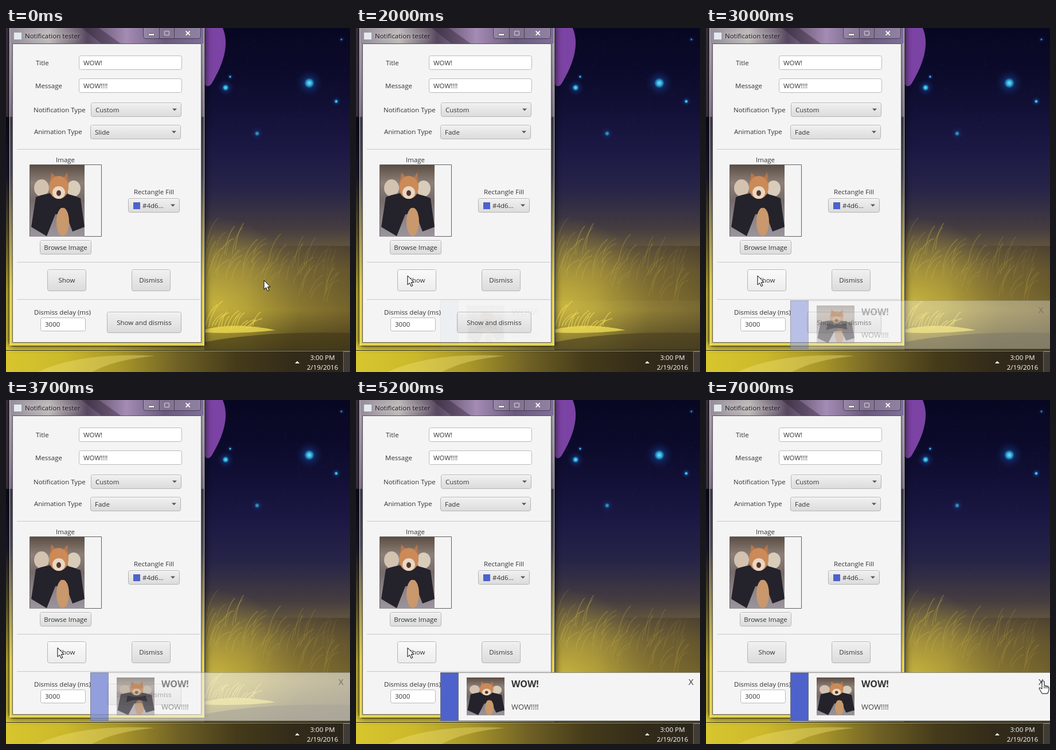
These frames come from a looping animation (600 px wide and 600 px high, 7100 ms). An HTML page with a canvas:

```html
<!DOCTYPE html>
<html lang="en">
<head>
<meta charset="utf-8">
<title>Notification tester</title>
<style>
html, body { margin: 0; width: 100%; height: 100%; overflow: hidden; background: #0b0a20; }
canvas { display: block; width: 600px; height: 600px; }
</style>
</head>
<body>
<canvas id="stage" width="600" height="600"></canvas>
<script>
const LOOP = 7100, STEP = 100;
const FONT = '"Open Sans", "Noto Sans", sans-serif';
const BLUE = '#4d62cb', INK = '#333';
const screen = document.getElementById('stage').getContext('2d');
let c = screen;

// Colours are spaced evenly along the line.
function blend(g, colors) {
  colors.forEach((color, i) => g.addColorStop(i / (colors.length - 1), color));
  return g;
}
const down = (y, h, ...colors) => blend(c.createLinearGradient(0, y, 0, y + h), colors);
const across = (x, w, ...colors) => blend(c.createLinearGradient(x, 0, x + w, 0), colors);

function rect(x, y, w, h, fill) {
  c.fillStyle = fill;
  c.fillRect(x, y, w, h);
}

function box(x, y, w, h, r, fill, line, width = 1) {
  c.beginPath();
  c.roundRect(x + 0.5, y + 0.5, w - 1, h - 1, r);
  if (fill) { c.fillStyle = fill; c.fill(); }
  if (line) { c.strokeStyle = line; c.lineWidth = width; c.stroke(); }
}

function text(s, x, y, color = INK, size = 11.5, weight = 400, align = 'left') {
  c.font = `${weight} ${size}px ${FONT}`;
  c.textAlign = align;
  c.fillStyle = color;
  c.fillText(s, x, y);
}

function shape(path, fill, line) {
  const p = new Path2D(path);
  c.fillStyle = fill;
  c.fill(p);
  if (line) { c.strokeStyle = line; c.lineWidth = 1; c.stroke(p); }
}

function oval(x, y, rx, ry, fill) {
  c.beginPath();
  c.ellipse(x, y, rx, ry, 0, 0, Math.PI * 2);
  c.fillStyle = fill;
  c.fill();
}

function glow(x, y, r, ...colors) {
  oval(x, y, r, r, blend(c.createRadialGradient(x, y, 0, x, y, r), colors));
}

function withShadow(blur, color, paint) {
  c.save();
  c.shadowBlur = blur;
  c.shadowColor = color;
  paint();
  c.restore();
}

function seeded(seed) {
  return () => (seed = (seed * 16807) % 2147483647) / 2147483647;
}

function star(x, y, r) {
  glow(x, y, r * 3, 'rgba(30,125,205,0.8)', 'rgba(20,70,150,0.3)', 'rgba(15,40,110,0)');
  glow(x, y, r, '#7de2f5', '#35b5dc', 'rgba(35,150,210,0.3)');
}

function drawSky() {
  rect(0, 0, 600, 600, down(0, 562, '#080722', '#0b0a2a', '#121036', '#1b1944',
    '#272448', '#463d40', '#85743a', '#a18e34', '#53481c'));
  glow(365, 480, 150, 'rgba(222,202,66,0.6)', 'rgba(215,195,62,0.3)', 'rgba(215,195,62,0)');
  rect(420, 380, 180, 182, across(420, 180, 'rgba(50,38,28,0)', 'rgba(50,38,28,0.4)'));

  const rnd = seeded(71);
  for (let i = 0; i < 60; i++) {
    rect(348 + rnd() * 250, rnd() * 210, 1, 1, 'rgba(80,120,205,0.3)');
  }
  star(529, 96, 8);
  star(383, 104, 5);
  star(391, 85, 2);
  star(576, 128, 3);
  c.globalAlpha = 0.6;
  star(438, 184, 4);
  star(585, 20, 2);
  c.globalAlpha = 1;
  shape('M346 0H378C390 28 380 62 358 98Q350 106 346 96Z', '#7b43a3');
}

function blade(x, y, dx, dy, color, width) {
  c.beginPath();
  c.moveTo(x, y);
  c.quadraticCurveTo(x + dx * 0.25, y + dy * 0.7, x + dx, y + dy);
  c.strokeStyle = color;
  c.lineWidth = width;
  c.stroke();
}

function drawGrass() {
  const rnd = seeded(19);
  for (let i = 0; i < 70; i++) {
    const far = rnd();
    blade(348 + far * 220, 375 + far * 45 + rnd() * 60, 8 + rnd() * 18, -20 - rnd() * 32,
      `rgba(205,182,72,${0.4 - far * 0.25})`, 0.7 + rnd());
  }
  for (let i = 0; i < 16; i++) {
    blade(348 + i * 5.5, 526 - rnd() * 8, 8 + rnd() * 22, -10 - rnd() * 42,
      'rgba(240,220,82,0.6)', 1.6);
  }
  shape('M346 526Q400 512 470 527Q410 534 346 531Z', 'rgba(243,224,82,0.75)');
  shape('M346 548Q450 528 600 532V562H346Z', 'rgba(65,56,24,0.6)');
  rect(0, 0, 6, 155, '#443b49');
  rect(0, 155, 6, 407, down(155, 407, '#0b0a1a', '#1c1a32', '#6e6232', '#d6c438', '#e0cf3c'));
  rect(0, 554, 346, 8, across(0, 346, '#dccb3a', '#d2c038', '#776a26'));
}

function drawTaskbar() {
  rect(0, 562, 600, 38, across(0, 600, '#d8c62e', '#cbb92c', '#a8962a', '#6f6125',
    '#453b1a', '#332b19', '#2a251d'));
  shape('M55 600Q130 565 260 572Q190 578 150 600Z', 'rgba(240,226,115,0.4)');
  rect(0, 562, 600, 1, '#2b260f');
  rect(0, 563, 600, 1, 'rgba(255,255,215,0.45)');
  shape('M504 585l4 -4l4 4Z', '#fff');
  text('3:00 PM', 552, 579, '#fff', 11.5, 400, 'center');
  text('2/19/2016', 552, 596, '#fff', 11.5, 400, 'center');
  box(588, 564, 14, 38, 0, 'rgba(255,255,255,0.1)', '#777162');
}

// Drawn on a 95 by 125 plate.
function drawPhoto(x, y, w, h) {
  c.save();
  c.translate(x, y);
  c.scale(w / 95, h / 125);
  rect(0, 0, 95, 125, down(0, 125, '#5b4d43', '#8d8078', '#756a69', '#8d8489', '#9b949c'));
  oval(20, 40, 13, 15, '#d3c2b0');
  oval(76, 41, 12, 14, '#d8ccba');
  shape('M10 56Q48 40 88 58L95 108L74 116L62 84L44 86L29 124L2 108Z', '#24222a');
  oval(57, 99, 11, 25, '#c9986c');
  shape('M34 36L37 13L48 24H57L65 13L67 36Z', '#b8764a');
  oval(50, 39, 17, 20, '#cb8a57');
  oval(50, 48, 11, 11, '#e9d7c2');
  oval(50, 49, 4, 5, '#53352f');
  shape('M27 60Q50 68 73 59L77 80Q50 68 24 82Z', '#24222a');
  c.restore();
}

const arrow = (x, y) => shape(`M${x - 4} ${y - 2}h8l-4 4Z`, '#555');

function button(x, y, w, h, label, hover) {
  const fill = hover ? down(y, h, '#fafafa', '#ececec') : down(y, h, '#f1f1f1', '#dbdbdb');
  box(x, y, w, h, 3, fill, '#b4b4b4');
  rect(x + 2, y + 1, w - 4, 1, 'rgba(255,255,255,0.8)');
  if (label) text(label, x + w / 2, y + h / 2 + 4, INK, 11.5, 400, 'center');
}

function field(x, y, w, h, value) {
  box(x, y, w, h, 3, '#fff', '#b9b9b9');
  text(value, x + 8, y + h / 2 + 4);
}

function combo(x, y, w, h, value, indent = 8) {
  button(x, y, w, h);
  text(value, x + indent, y + h / 2 + 4);
  arrow(x + w - 12, y + h / 2);
}

function drawFrame() {
  withShadow(12, 'rgba(0,0,0,0.75)', () => box(5, -6, 342, 561, 6, '#45434e', '#25222b'));
  rect(6, 0, 340, 155, down(0, 155, '#a39da6', '#8d8594', '#75657f'));
  rect(6, 155, 340, 399, down(155, 399, '#383640', '#494650', '#92864a', '#dac947', '#e0d04a'));
  rect(7, 0, 338, 27, across(7, 338, '#958d9a', '#bcb7b7', '#57475f', '#a48cb4', '#69597d', '#80709a'));
  shape('M132 0h30l38 27h-34Z', 'rgba(35,25,42,0.35)');
  box(6, -6, 340, 560, 5, null, 'rgba(255,255,255,0.65)');
  box(11, 27, 330, 522, 0, '#f4f4f4', '#55515a');
  rect(14, 8, 13, 12, '#e3ebf0');
  withShadow(8, 'rgba(255,255,255,0.8)', () => text('Notification tester', 33, 18, '#1d1b20'));
}

function drawForm() {
  text('Title', 52, 65);
  field(127, 48, 180, 25, 'WOW!');
  text('Message', 51, 105);
  field(127, 88, 180, 25, 'WOW!!!!');
  text('Notification Type', 48, 147);
  combo(148, 130, 158, 25, 'Custom');
  text('Animation Type', 49, 185);

  text('Image', 87, 234);
  box(41, 238, 126, 126, 0, null, '#606060');
  drawPhoto(42, 239, 95, 125);
  button(59, 370, 90, 25, 'Browse Image');
  text('Rectangle Fill', 223, 290);
  combo(213, 297, 90, 25, '#4d6...', 25);
  rect(222, 304, 12, 12, BLUE);

  button(219, 421, 68, 38, 'Dismiss');
  text('Dismiss delay (ms)', 49, 500);
  field(60, 505, 79, 24, '3000');
  button(176, 495, 130, 37, 'Show and dismiss');
  for (const y of [211, 408, 473]) rect(19, y, 320, 1, '#c9c9c9');
}

function drawCaption(active) {
  const edge = 'rgba(40,34,46,0.65)';
  if (active) {
    const light = 'rgba(255,255,255,0.35)';
    rect(6, 0, 340, 27, light);
    rect(6, 27, 5, 128, light);
    rect(341, 27, 5, 128, light);
  }
  box(239, -5, 101, 24, 4, 'rgba(185,177,190,0.28)', edge);
  if (active) box(293, -5, 47, 24, 4, down(0, 18, '#d99583', '#b23d27', '#c96348'), '#582019');
  rect(267, 0, 1, 18, edge);
  rect(293, 0, 1, 18, edge);
  box(248, 9, 11, 5, 1, '#fff', '#514c55');
  box(276, 5, 9, 8, 1, null, '#c2bcc6', 1.5);
  text('✕', 317, 14, '#fff', 13, 700, 'center');
}

function drawMenu(selected) {
  withShadow(8, 'rgba(0,0,0,0.4)', () => rect(148, 197, 156, 73, '#fff'));
  box(147, 193, 158, 77, 0, '#fff', '#bababa');
  ['Slide', 'Fade', 'Popup'].forEach((s, i) => {
    const y = 195 + i * 24.5, on = i === selected;
    if (on) rect(148, y, 156, 24.5, '#0096c9');
    text(s, 153, y + 17, on ? '#fff' : INK);
  });
}

function drawToast(alpha) {
  c.globalAlpha = alpha;
  box(147, 475, 454, 85, 0, '#f4f4f4', '#858585');
  box(147, 475, 32, 85, 0, BLUE, '#6e7188');
  drawPhoto(193, 484, 66, 66);
  text('WOW!', 271, 501, INK, 16, 700);
  text('WOW!!!!', 271, 540, '#444', 13);
  text('X', 580, 497, INK, 15);
  c.globalAlpha = 1;
}

const drawPointer = (x, y) =>
  shape(`M${x} ${y}v16l3.6 -3.4l2.6 6l2.6 -1.2l-2.5 -5.8h4.7Z`, '#fff', '#000');

function drawHand(x, y) {
  shape(`M${x - 2} ${y}q2 -3 4 0v7l7 1.5q2 1 1 6l-2 6.5h-10l-5 -9q0 -3 5 1Z`, '#fff', '#000');
  for (let i = 0; i < 3; i++) rect(x + 1.5 + i * 3, y + 8, 1, 4, '#000');
}

function pointerAt(t) {
  let x = 450, y = 440;
  const glide = (start, end, toX, toY) => {
    const p = Math.min(1, Math.max(0, (t - start) / (end - start)));
    const ease = p * p * (3 - 2 * p);
    x += (toX - x) * ease;
    y += (toY - y) * ease;
  };
  glide(100, 700, 292, 183);
  glide(850, 1050, 182, 220);
  glide(1200, 1400, 173, 233);
  glide(1500, 1950, 90, 432);
  glide(6200, 6800, 588, 491);
  return [x, y];
}

const inside = (x, y, l, t, w, h) => x >= l && x <= l + w && y >= t && y <= t + h;

const backdrop = document.createElement('canvas');
backdrop.width = backdrop.height = 600;

function buildBackdrop() {
  c = backdrop.getContext('2d');
  drawSky();
  drawGrass();
  drawTaskbar();
  drawFrame();
  drawForm();
  c = screen;
}

function draw(t) {
  const [x, y] = pointerAt(t);
  const active = t >= 700 && t < 1900;
  c.drawImage(backdrop, 0, 0);
  drawCaption(active);
  combo(147, 169, 158, 25, t < 1500 ? 'Slide' : 'Fade');
  if (active) box(147, 169, 158, 25, 3, null, '#139fcf', 1.5);
  button(72, 421, 68, 38, 'Show', inside(x, y, 72, 421, 68, 38));
  if (t >= 800 && t < 1500) drawMenu(t < 1300 ? 0 : 1);
  const alpha = Math.min(1, (t - 1900) / 3100);
  if (alpha > 0) drawToast(alpha);
  if (inside(x, y, 577, 482, 18, 18)) drawHand(x, y);
  else drawPointer(x, y);
}

let last = -1;
function tick() {
  const t = Math.floor((performance.now() % LOOP) / STEP) * STEP;
  if (t !== last) draw(last = t);
  requestAnimationFrame(tick);
}

buildBackdrop();
tick();
</script>
</body>
</html>
```
